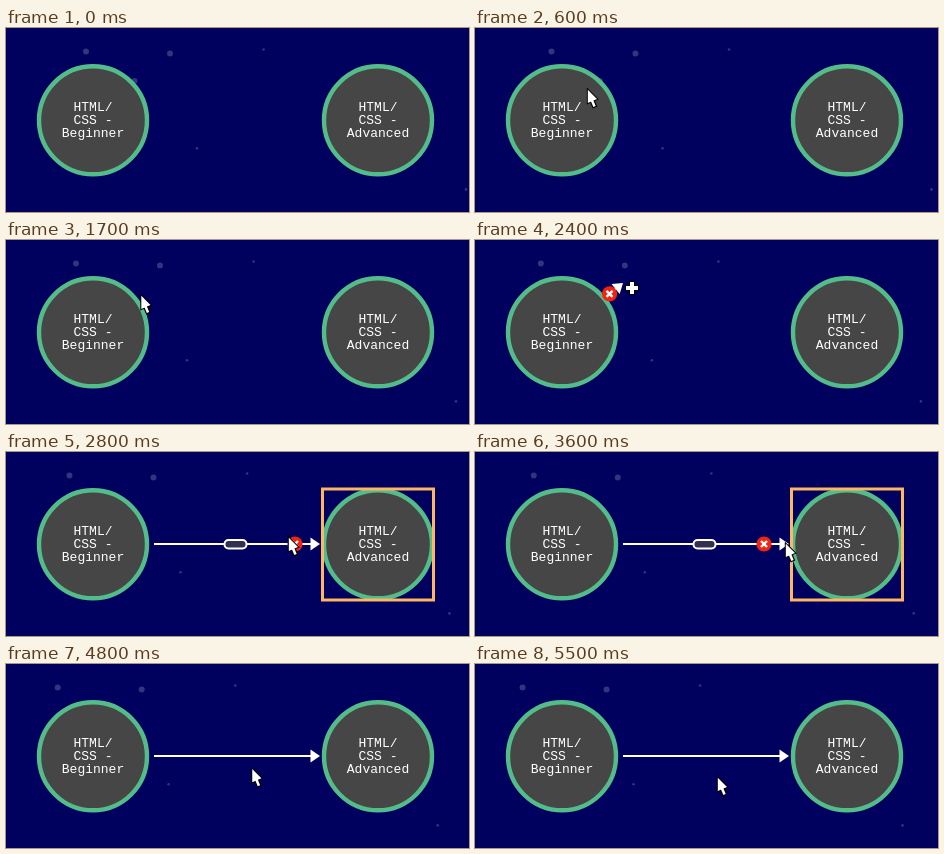
Recreate the animation shown at these times as an HTML page with a canvas. Size 463 px wide and 184 px high, loop 5.6 s.

```html
<!DOCTYPE html>
<html lang="en">
<head>
<meta charset="utf-8">
<style>
  html, body { margin: 0; width: 100%; height: 100%; overflow: hidden; background: #00005e; }
  canvas { display: block; }
</style>
</head>
<body>
<canvas id="stage" width="463" height="184"></canvas>
<script>
const stage = document.getElementById('stage');
const ctx = stage.getContext('2d');
const LOOP = 5600, STEP = 100, DRIFT = 0.0059;
const LEFT_X = 87, RIGHT_X = 372, MID_Y = 92;
const NODE_R = 54, LINK_GAP = 61, LINK_END = 314;
const CURSOR_IN = 300, DRAG = 2300, SNAP = 2800, DROP = 3700, LEAVE = 4800;

const bigDots = [{ x: 80, y: 23.5 }, { x: 164, y: 25.5 }, { x: 128.5, y: 53 }];
const smallDots = [{ x: 257.6, y: 21.5 }, { x: 191, y: 120.2 }, { x: 460, y: 161.4 }];

// Where the pointer rests between eased moves
const waypoints = [
  { t: 1000, x: 112, y: 60 },
  { t: 2400, x: 157, y: 48 },
  { t: 2800, x: 282, y: 84 },
  { t: 3600, x: 310, y: 90 },
  { t: 4300, x: 247.5, y: 98 },
  { t: 5500, x: 242, y: 112 }
];

const ease = k => k * k * (3 - 2 * k);
const mix = (a, b, k) => a + (b - a) * k;

function fill(color) {
  ctx.fillStyle = color;
  ctx.fill();
}

function stroke(color, width) {
  ctx.strokeStyle = color;
  ctx.lineWidth = width;
  ctx.stroke();
}

function circle(x, y, r) {
  ctx.beginPath();
  ctx.arc(x, y, r, 0, Math.PI * 2);
}

function triangle(...points) {
  ctx.beginPath();
  points.forEach(p => ctx.lineTo(...p));
  ctx.closePath();
}

function segment(x1, y1, x2, y2, color, width) {
  ctx.beginPath();
  ctx.moveTo(x1, y1);
  ctx.lineTo(x2, y2);
  stroke(color, width);
}

function at(x, y, angle, draw) {
  ctx.save();
  ctx.translate(x, y);
  ctx.rotate(angle);
  draw();
  ctx.restore();
}

function pointerAt(t) {
  const next = waypoints.findIndex(p => p.t > t);
  if (next < 0) return waypoints.at(-1);
  if (next === 0) return waypoints[0];
  const a = waypoints[next - 1], b = waypoints[next];
  const k = ease((t - a.t) / (b.t - a.t));
  return { x: mix(a.x, b.x, k), y: mix(a.y, b.y, k) };
}

function drawDots(dots, r, t) {
  for (const { x, y } of dots) {
    circle(x - t * DRIFT, y, r);
    fill('rgba(255,255,255,.2)');
  }
}

function drawNode(x, level) {
  circle(x, MID_Y + .3, NODE_R);
  fill('#464646');
  stroke('#53bd89', 4.4);
  ctx.fillStyle = '#fff';
  ctx.font = '13px "Liberation Mono", monospace';
  ctx.textAlign = 'center';
  ['HTML/', 'CSS -', level].forEach((line, i) => ctx.fillText(line, x, 83 + 13 * i));
}

function drawHighlight(x) {
  const r = NODE_R + 1.5;
  ctx.beginPath();
  ctx.rect(x - r, MID_Y + .5 - r, r * 2, r * 2);
  stroke('#feb663', 3);
}

function drawPill(x) {
  ctx.beginPath();
  ctx.roundRect(x - 11, -4, 22, 8.5, 4);
  fill('#30304f');
  stroke('#fff', 2);
}

function drawRemoveButton() {
  circle(0, 0, 7.6);
  fill('#f5220f');
  segment(-3, -3, 3, 3, '#fff', 2.4);
  segment(3, -3, -3, 3, '#fff', 2.4);
}

function drawLink(t, pointer) {
  const dx = (t < SNAP ? pointer.x - 9 : LINK_END) - LEFT_X;
  const dy = (t < SNAP ? pointer.y - 5 : MID_Y) - MID_Y;
  const angle = Math.atan2(dy, dx);
  const length = Math.max(0, Math.hypot(dx, dy) - LINK_GAP);
  const hasTools = t < LEAVE;

  at(LEFT_X, MID_Y, angle, () => {
    ctx.translate(LINK_GAP, 0);
    if (length > 10) segment(0, 0, length - 8, 0, '#fff', 2);
    triangle([length, 0], [length - 9.5, -6.5], [length - 9.5, 6.5]);
    fill('#fff');
    if (hasTools && length > 40) drawPill(length / 2 - 1.5);
    if (hasTools) at(Math.max(0, length - 25), 0, -angle, drawRemoveButton);
  });
}

function drawCross() {
  for (const [color, reach, width] of [['#000', 7, 6], ['#fff', 6, 4]]) {
    segment(-reach, 0, reach, 0, color, width);
    segment(0, -reach, 0, reach, color, width);
  }
}

function drawArrow() {
  const head = () => triangle([.8, 1.8], [.8, 15], [10, 11]);
  head();
  stroke('#000', 2);
  segment(4, 10, 8, 19.5, '#000', 5);
  segment(4, 10, 7.5, 18.4, '#fff', 2.6);
  head();
  fill('#fff');
}

function drawPointer(t, { x, y }) {
  const onLink = (t >= DRAG && t < SNAP) || (t > DROP && t < LEAVE);
  at(x, y, 0, onLink ? drawCross : drawArrow);
}

function frame(now) {
  const t = Math.floor(now % LOOP / STEP) * STEP;
  const pointer = pointerAt(t);
  ctx.clearRect(0, 0, stage.width, stage.height);
  drawDots(bigDots, 3, t);
  drawDots(smallDots, 1.3, t);
  drawNode(LEFT_X, 'Beginner');
  drawNode(RIGHT_X, 'Advanced');
  if (t >= SNAP && t < DROP) drawHighlight(RIGHT_X);
  if (t >= DRAG) drawLink(t, pointer);
  if (t >= CURSOR_IN) drawPointer(t, pointer);
  requestAnimationFrame(frame);
}
requestAnimationFrame(frame);
</script>
</body>
</html>
```
